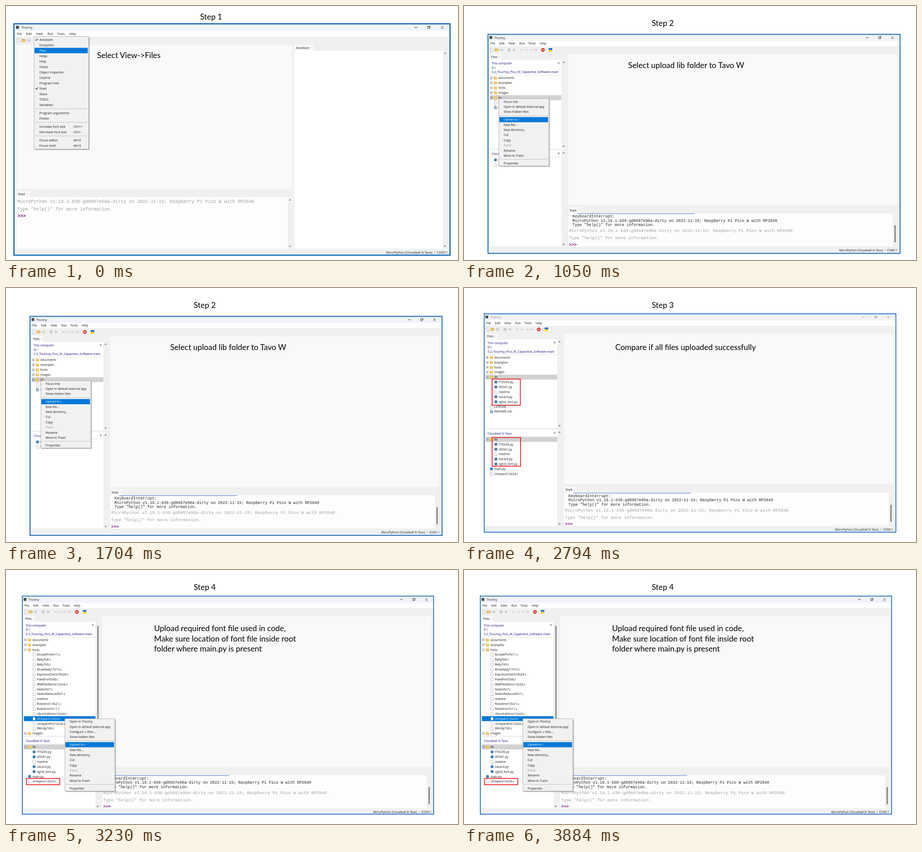
Write an HTML page that moves like this. It is 998 by 561 pixels and loops after 4.32 s.

```html
<!DOCTYPE html>
<html lang="en">
<head>
<meta charset="utf-8">
<title>Uploading files in four steps</title>
<style>
html, body { margin: 0; width: 100%; height: 100%; overflow: hidden; background: #fff; }
svg { display: block; width: 100vw; height: 100vh; }
text { white-space: pre; }
</style>
</head>
<body>
<svg id="stage" viewBox="0 0 998 561"></svg>
<script>
const UI = "'Open Sans', 'Noto Sans', sans-serif";
const MONO = "'Liberation Mono', monospace";
const HEAD = "Lato, sans-serif";
const BLUE = '#0078d7', NAVY = '#15158c', PANEL = '#f9f9f9', CHROME = '#f0f0f0';
const BOARD = 'Cloudleaf Xi Tavo';
const STARTS = [0, 1050, 2140, 3230], LOOP = 4320;

// Basic shapes; text is placed by its left edge and vertical middle.
const rect = (x, y, w, h, fill, more = '') =>
  `<rect x="${x}" y="${y}" width="${w}" height="${h}" fill="${fill}" ${more}/>`;
const path = (d, stroke, width = 0.8, fill = 'none') =>
  `<path d="${d}" stroke="${stroke}" stroke-width="${width}" fill="${fill}"/>`;
const text = (x, y, s, { size = 6.75, fill = '#1c1c1c', font = UI, weight = 400, anchor = 'start' } = {}) =>
  `<text x="${x}" y="${y + size * 0.36}" font-family="${font}" font-size="${size}" font-weight="${weight}" fill="${fill}" text-anchor="${anchor}">${s}</text>`;
const heading = (x, y, s) => text(x, y, s, { size: 17.4, fill: '#000', font: HEAD });
const group = (x, y, scale, body) =>
  `<g transform="translate(${x} ${y}) scale(${scale})">${body}</g>`;
const outline = (x0, y0, x1, y1, color, width) =>
  rect(x0, y0, x1 - x0, y1 - y0, 'none', `stroke="${color}" stroke-width="${width}"`);
const arrow = (x, y, dir) =>
  path(`M${x - 2.6} ${y + 1.6 * dir}h5.2l-2.6 ${-3.6 * dir}z`, 'none', 0, '#8a8a8a');

// Icons
const page = (x, y, tint = '#fff') =>
  path(`M${x - 2.6} ${y - 3.4}h3.4l2 2v4.8h-5.4z`, '#8c8c8c', 0.6, tint);
const folder = (x, y) =>
  path(`M${x - 3.3} ${y + 3}v-6h2.4l1 1h3v5z`, '#d9a02c', 0.5, '#f7cb5c');
const script = (x, y) => `<circle cx="${x}" cy="${y}" r="3.3" fill="#4482ad"/>`;
const ICONS = {
  dir: folder,
  py: script,
  md: (x, y) => page(x, y, '#8fb4d8'),
  file: (x, y) => page(x, y)
};

function toolbar(y) {
  const faint = '#c3c3c3';
  const step = x => path(`M${x - 3.5} ${y + 1}q2.5 -4.5 5 -.5m1 -2v3h-3`, faint, 0.9);
  return page(61.5, y) +
    path(`M68.7 ${y + 3}v-6h2.5l1 1h3v1.5`, '#c08a1e', 0.6, '#f3c04b') +
    path(`M68.7 ${y + 3}l1.8 -3.7h6.2l-1.8 3.7z`, '#c08a1e', 0.5, '#f8d77e') +
    rect(80, y - 3, 6.3, 6, '#c6c6cc') + rect(81.5, y - 3, 3.2, 2, '#ececec') + rect(81.2, y + 0.6, 4, 2.4, '#e4e4e4') +
    `<circle cx="99.7" cy="${y}" r="3.4" fill="${faint}"/>` + path(`M98.8 ${y - 1.6}l2.4 1.6l-2.4 1.6z`, 'none', 0, '#f4f4f4') +
    `<ellipse cx="110.3" cy="${y}" rx="2" ry="2.6" fill="${faint}"/>` + path(`M107.3 ${y - 2}l6 4m0 -4l-6 4`, faint, 0.7) +
    step(126.5) + step(137) + step(147.5) +
    path(`M154.5 ${y - 2.2}l4 2.2l-4 2.2z`, 'none', 0, faint) + path(`M159 ${y - 2.2}l2.8 2.2l-2.8 2.2z`, 'none', 0, faint) +
    path(`M172.4 ${y - 4}h3.4l2.4 2.4v3.3l-2.4 2.4h-3.4l-2.4 -2.4v-3.3z`, 'none', 0, '#d8342c') +
    rect(171.6, y - 0.9, 5, 1.8, '#f6d5d2') +
    rect(187, y - 4, 8, 4, '#1f6fd0') + rect(187, y, 8, 4, '#ffd91f');
}

// Title bar, menus, toolbar and status line, shared by all steps.
function chrome(idle) {
  const ink = idle ? '#8d8d8d' : '#222';
  const menus = [['File', 58], ['Edit', 77.5], ['View', 98], ['Run', 122], ['Tools', 142], ['Help', 167]];
  return rect(53, 62.5, 910, 14.5, idle ? '#f4f4f4' : '#f0f4fa') +
    rect(53, 77, 910, 12, '#fefefe') +
    rect(56.3, 66.5, 6.2, 6.2, '#4a4a4a') +
    text(67, 70.2, 'Thonny', { fill: ink }) +
    path('M888 70h5.6', ink, 0.9) +
    outline(915.6, 68.2, 919.6, 72.2, ink, 0.8) + path('M917 67.2h3.6v3.6', ink, 0.7) +
    path('M943.3 67.4l5.4 5.4m0 -5.4l-5.4 5.4', ink, 0.8) +
    menus.map(([s, x]) => text(x, 83, s)).join('') +
    toolbar(97) +
    text(957, 539.3, `MicroPython (${BOARD})  •  COM11`, { anchor: 'end', size: 6.6 });
}

function tab(x, y, w, s, size = 6.75) {
  return rect(x, y, w, 13, PANEL) + text(x + 3, y + 6.3, s, { size }) +
    text(x + w - 5.5, y + 6.3, '×', { size: size - 1.5, fill: '#aaa' });
}

// Items: string, [label, shortcut], or null for a separator.
function menu(x, y, w, h, pitch, items, { size, pad, active, ticks = [], off }) {
  let out = rect(x + 2, y + 2, w, h, '#000', 'opacity=".28"') +
    rect(x, y, w, h, '#f1f1f1', 'stroke="#a5a5a5" stroke-width=".8"');
  let row = y + pitch * 0.57;
  for (const item of items) {
    if (!item) {
      const line = row - pitch * 0.28;
      out += path(`M${x + 2} ${line}h${w - 4}`, '#b5b5b5', 0.8);
      row += pitch / 2;
      continue;
    }
    const [label, keys] = [].concat(item);
    const on = label === active;
    if (on) out += rect(x + 1, row - pitch / 2, w - 3, pitch, BLUE);
    if (ticks.includes(label)) out += path(`M${x + 3.5} ${row}l1.6 1.8l3 -4`, '#111', 1.1);
    const fill = on ? '#fff' : label === off ? '#9a9a9a' : '#1c1c1c';
    out += text(x + pad, row, label, { size, fill });
    if (keys) out += text(x + 87, row, keys, { size });
    row += pitch;
  }
  return out;
}

function contextMenu(x, y, h, first) {
  const items = [...first, 'Show hidden files', null, 'Upload to /', 'New file...', 'New directory...',
    'Cut', 'Copy', 'Paste', 'Rename', 'Move to Trash', null, 'Properties'];
  return menu(x, y, 110.5, h, 11.35, items, { size: 6.75, pad: 10.5, active: 'Upload to /', off: 'Paste' });
}

// Rows: [name, kind, depth, state]; state may hold "open" and a highlight.
function tree(y, rows) {
  return rows.map(([name, kind, depth = 0, { open, mark } = {}], i) => {
    const cy = y + i * 10.87, x = 69.5 + depth * 10;
    let out = mark ? rect(57, cy - 5.4, 158, 10.8, mark) : '';
    if (kind === 'dir') {
      out += outline(58.2, cy - 2.3, 62.8, cy + 2.3, '#8e8e8e', 0.6) +
        path(`M59.2 ${cy}h2.6` + (open ? '' : `M60.5 ${cy - 1.3}v2.6`), '#333', 0.6);
    }
    return out + ICONS[kind](x, cy) + text(x + 6.2, cy, name, { fill: mark === BLUE ? '#fff' : '#1c1c1c' });
  }).join('');
}

function filesPane(split, local, remote, scrolled) {
  const burger = y => path(`M207.4 ${y - 1.5}h3.6m-3.6 1.5h3.6m-3.6 1.5h3.6`, '#555', 0.7);
  const name = (y, s) => text(61, y, s, { fill: NAVY });
  const rule = y => path(`M57 ${y}h158`, '#dcdce6', 0.7);
  return tab(57, 106, 25, 'Files') +
    rect(57, 119, 158, split - 119, '#fff') + rect(57, split + 3, 158, 528 - split, '#fff') +
    name(127, 'This computer') + name(136.3, 'D:\\') +
    name(146, '3.2_Touchsy_Pico_W_Capacitive_Software-main') + rule(153) +
    name(split + 12, BOARD) + rule(split + 18.5) + burger(126) + burger(split + 10.5) +
    (scrolled ? rect(219, 128, 3, 206, '#8a8a8a') : arrow(220, 124, 1) + arrow(220, split - 5, -1)) +
    arrow(220, split + 9, 1) + arrow(220, 527, -1) +
    tree(159, local) + tree(split + 25, remote);
}

const BANNER = 'MicroPython v1.19.1-630-gd0687e90a-dirty on 2022-11-15; Raspberry Pi Pico W with RP2040';
const HELP = 'Type "help()" for more information.';
const mono = (x, y, s, size, fill, weight) => text(x, y, s, { size, fill, font: MONO, weight });

function editorAndShell() {
  return rect(230, 107, 727, 332, PANEL) + tab(230, 445, 27, 'Shell') +
    rect(230, 458, 717, 73, '#fdfdfd') +
    path('M250 458.6h260', '#3f74d1', 1) +
    mono(239.5, 464.2, 'KeyboardInterrupt:', 8.66, '#222') +
    mono(239.5, 473.5, BANNER, 8.66, '#222') +
    mono(239.5, 483, HELP, 8.66, '#222') +
    mono(232, 496, BANNER, 9.46, '#a0a0a0') +
    mono(232, 512, HELP, 9.46, '#a0a0a0') +
    mono(232, 526.5, '>>>', 9.46, '#800080', 700) +
    rect(950.3, 484, 3, 38, '#858585');
}

const frame = (x0, y0, x1, y1, body, width) =>
  rect(x0, y0, x1 - x0, y1 - y0, CHROME) + body + outline(x0, y0, x1, y1, '#1268b8', width);

const libFiles = [['FT6236.py', 'py', 1], ['ili9341.py', 'py', 1], ['readme', 'file', 1],
  ['sdcard.py', 'py', 1], ['xglcd_font.py', 'py', 1]];
const dirs = [['documents', 'dir'], ['examples', 'dir'], ['fonts', 'dir'], ['images', 'dir']];
const docs = [['LICENSE', 'file'], ['README.md', 'md']];
const root = [['main.py', 'py'], ['Unispace12x24.c', 'file']];
const GREY = '#d2d2d2';
const lib = open => ['lib', 'dir', 0, { open, mark: GREY }];
const remoteLib = [lib(true), ...libFiles, ...root];
const fontFiles = ['ArcadePix9x11.c', 'Bally5x8.c', 'Bally7x9.c', 'Broadway17x15.c', 'EspressoDolce18x24.c',
  'FixedFont5x8.c', 'IBMPlexMono12x24.c', 'Neato5x7.c', 'NeatoReduced5x7.c', 'readme', 'Robotron13x21.c',
  'Robotron7x11.c', 'UbuntuMono12x24.c', 'Unispace12x24.c', 'UnispaceExt12x24.c', 'Wendy7x8.c']
  .map(s => [s, 'file', 1, s === 'Unispace12x24.c' ? { mark: BLUE } : {}]);

function stepOne() {
  const size = 7.1;
  const items = ['Assistant', 'Exception', 'Files', 'Heap', 'Help', 'Notes', 'Object inspector', 'Outline',
    'Program tree', 'Shell', 'Stack', 'TODO', 'Variables', null, 'Program arguments', 'Plotter', null,
    ['Increase font size', 'Ctrl++'], ['Decrease font size', 'Ctrl+-'], null,
    ['Focus editor', 'Alt+E'], ['Focus shell', 'Alt+S']];
  const body = group(-37.47, -26.56, 1.058, chrome()) +
    rect(23, 86, 609, 318, PANEL) +
    tab(23, 409, 29, 'Shell', size) + rect(23, 422, 599, 114, '#fdfdfd') +
    arrow(627, 428, 1) + arrow(627, 531, -1) +
    tab(637, 86, 42, 'Assistant', size) + rect(637, 99, 328, 437, '#fff') +
    arrow(969.5, 104, 1) + arrow(969.5, 531, -1) +
    mono(25, 431.5, BANNER, 10.02, '#a0a0a0') + mono(25, 448.3, HELP, 10.02, '#a0a0a0') +
    mono(25.5, 463.8, '>>>', 10.02, '#800080', 700);
  return heading(428.5, 24, 'Step 1') + frame(17.5, 39.3, 980.5, 550.3, body, 2.6) +
    menu(62, 67.5, 120.5, 248.5, 12, items, { size, pad: 11.7, active: 'Files', ticks: ['Assistant', 'Shell'] }) +
    heading(201, 109, 'Select View-&gt;Files');
}

function stepTwo() {
  const body = chrome() + filesPane(315, [...dirs, lib(false), ...docs], root) + editorAndShell();
  return heading(414.5, 38, 'Step 2') + frame(53, 62.6, 962.8, 546.4, body, 2) +
    contextMenu(77, 204.8, 148.5, ['Focus into', 'Open in default external app']) +
    heading(362.5, 130.5, 'Select upload lib folder to Tavo W');
}

function stepThree() {
  const local = [...dirs, lib(true), ...libFiles, ...docs];
  const body = group(-9, -5.6, 1, chrome(true) + filesPane(315, local, remoteLib) + editorAndShell());
  return heading(414.5, 38, 'Step 3') + frame(44.6, 57, 953.6, 539.3, body, 1.7) +
    outline(62, 201.2, 124.4, 259, '#e8141c', 1.7) + outline(62.2, 330.2, 125, 393.6, '#e8141c', 1.7) +
    heading(334, 130.5, 'Compare if all files uploaded successfully');
}

function stepFour() {
  const local = [...dirs.slice(0, 2), ['fonts', 'dir', 0, { open: true }], ...fontFiles, dirs[3]];
  const body = group(-17.5, -4.6, 1, chrome() + filesPane(370.5, local, remoteLib, true) + editorAndShell());
  const lines = ['Upload required font file used in code,', 'Make sure location of font file inside root',
    'folder where main.py is present'];
  return heading(414.5, 38, 'Step 4') + frame(36, 57.6, 944.2, 539.3, body, 1.7) +
    contextMenu(130, 328.3, 160, ['Open in Thonny', 'Open in default external app', 'Configure .c files...']) +
    outline(45, 460.4, 118.6, 474.2, '#e8141c', 1.7) +
    lines.map((s, i) => heading(327, 129 + i * 22.6, s)).join('');
}

const stage = document.getElementById('stage');
stage.innerHTML = [stepOne, stepTwo, stepThree, stepFour].map(draw => `<g>${draw()}</g>`).join('');
const scenes = [...stage.children];

function update(ms) {
  const t = ms % LOOP;
  const now = STARTS.filter(s => t >= s).length - 1;
  scenes.forEach((g, i) => g.setAttribute('display', i === now ? 'inline' : 'none'));
}

const begin = performance.now();
function tick() {
  update(performance.now() - begin);
  requestAnimationFrame(tick);
}
update(0);
requestAnimationFrame(tick);
</script>
</body>
</html>
```
